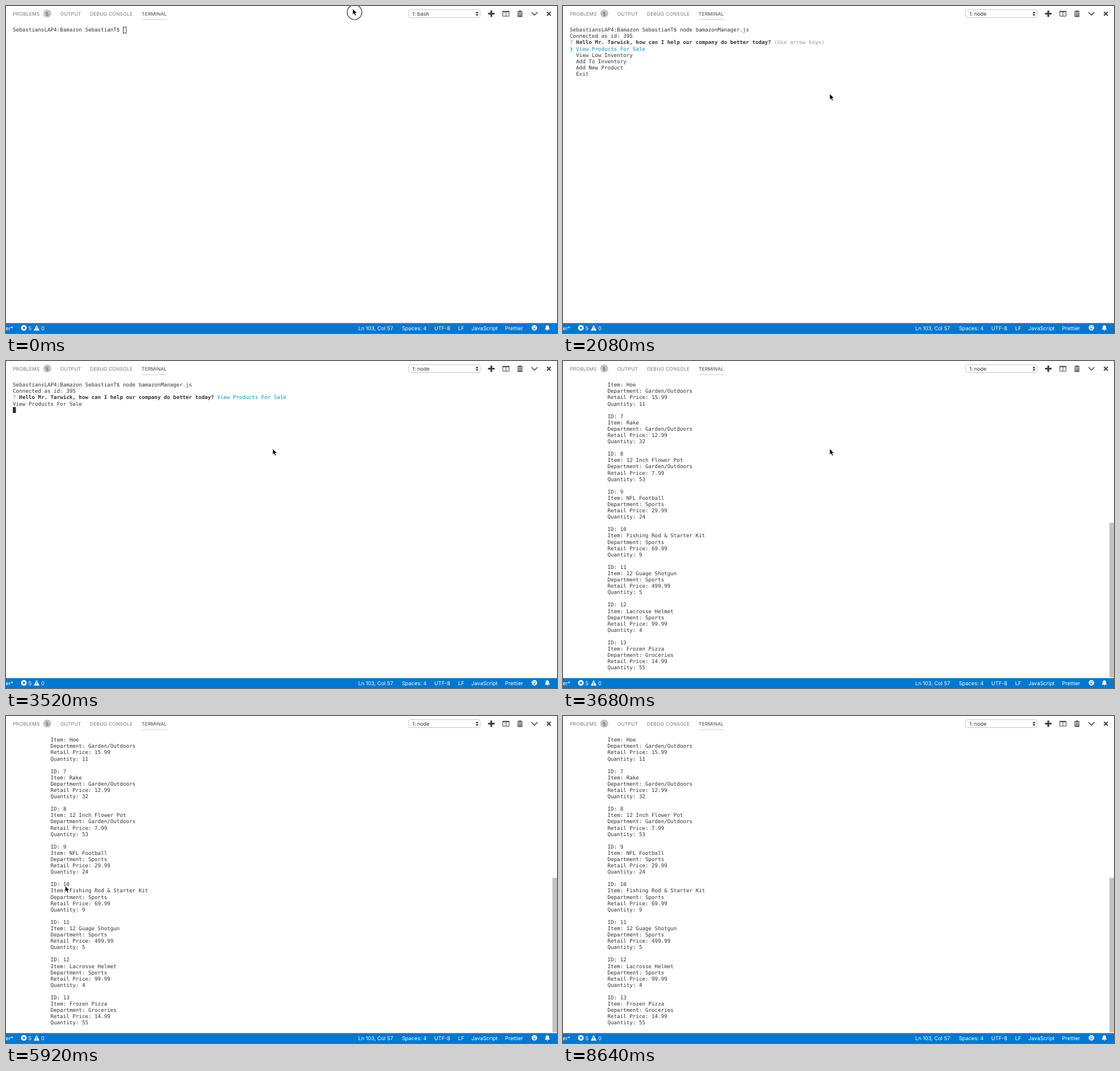
Write an HTML page that moves like this. It is 971 px wide and 577 px high and loops after 9120 ms.

```html
<!DOCTYPE html>
<html lang="en">
<head>
<meta charset="utf-8">
<title>Terminal session</title>
<style>
  html, body { margin: 0; width: 100%; height: 100%; overflow: hidden; background: #fff; }
  svg { display: block; position: absolute; left: 0; top: 0; }
  text { white-space: pre; text-rendering: geometricPrecision; font-family: Inter, Roboto, sans-serif; }
  .tabs text { font-size: 8.47px; letter-spacing: .2px; fill: #777; }
  .tabs .on { fill: #424242; }
  .status text { font-size: 9.24px; fill: #fff; }
  .term text { font: 9.215px "DejaVu Sans Mono", "Liberation Mono", monospace; fill: #333; }
  .term .bold { font-weight: bold; }
  .term .ok { fill: #16c60c; }
  .term .pick { fill: #0598bc; }
  .term .dim { fill: #999; }
</style>
</head>
<body>
<svg width="971" height="577" viewBox="0 0 971 577">
  <rect width="971" height="577" fill="#fff"/>

  <g class="tabs">
    <text x="12" y="17">PROBLEMS</text>
    <circle cx="72.7" cy="13.3" r="7" fill="#c4c4c4"/>
    <text x="70" y="16.5" style="fill:#444">5</text>
    <text x="95.7" y="17">OUTPUT</text>
    <text x="148" y="17">DEBUG CONSOLE</text>
    <text class="on" x="239" y="17">TERMINAL</text>
    <path d="M239 24H283" stroke="#c8c8c8"/>
  </g>

  <rect x="709.5" y="6.5" width="126" height="14" rx="3" fill="#fff" stroke="#c6c6c6"/>
  <text id="shell" x="716" y="16.9" font-size="9" fill="#333"></text>
  <path d="M827.5 12.7 830 9.5 832.5 12.7ZM827.5 14.5 830 17.7 832.5 14.5Z" fill="#333"/>

  <g fill="none" stroke="#424242">
    <path d="M849.5 13.5H861M855.2 8V19.3" stroke-width="3.2"/>
    <path d="M875.5 9.8H886.5V18H875.5ZM881 9V18"/>
    <path d="M875 9.7H887" stroke-width="2"/>
    <path d="M901 10.2H910.5M904 9.5V8.5H907.5V9.5" stroke-width="1.2"/>
    <path d="M902.3 11.5V18.5H909.2V11.5M904.6 11.5V18M906.9 11.5V18" stroke-width="1.3"/>
    <path d="M926 11 931.3 16.3 936.6 11" stroke-width="1.5"/>
    <path d="M953.3 10.3 960 17M960 10.3 953.3 17" stroke-width="2"/>
  </g>

  <g class="term">
    <g id="rows"></g>
    <rect id="caret" width="5.5" height="10.6"/>
  </g>
  <rect id="bar" x="963" y="285.5" width="8" height="272.5" fill="#c1c1c1"/>

  <g class="status">
    <rect y="559.5" width="971" height="17.5" fill="#0078d0"/>
    <text x="-.5" y="571.5">er*</text>
    <circle cx="31.5" cy="568" r="5" fill="#fff"/>
    <path d="M29.4 565.9 33.6 570.1M33.6 565.9 29.4 570.1" stroke="#0078d0" stroke-width="1.4"/>
    <text x="39.5" y="571.5">5</text>
    <path d="M54 562.8 59 572.8H49Z" fill="#fff"/>
    <path d="M54 566V569.6M54 570.5V571.7" stroke="#0078d0" stroke-width="1.2"/>
    <text x="62" y="571.5">0</text>
    <text x="620.7" y="571.5">Ln 103, Col 57</text>
    <text x="697.7" y="571.5">Spaces: 4</text>
    <text x="754.8" y="571.5">UTF-8</text>
    <text x="796.7" y="571.5">LF</text>
    <text x="820" y="571.5">JavaScript</text>
    <text x="879.6" y="571.5">Prettier</text>
    <circle cx="931.2" cy="567.8" r="4.8" fill="#fff"/>
    <path d="M928.5 568.8A2.8 2.8 0 0 0 933.9 568.8Z" fill="#0078d0"/>
    <g fill="#0078d0"><circle cx="929.6" cy="566.2" r=".9"/><circle cx="932.8" cy="566.2" r=".9"/></g>
    <path d="M949.3 571C951 569.8 950.8 568.5 951 566.5 951.2 564.5 952.3 563.6 954 563.2 955.7 563.6 956.8 564.5 957 566.5 957.2 568.5 957 569.8 958.7 571ZM952.7 571.7H955.3A1.3 1.3 0 0 1 952.7 571.7Z" fill="#fff"/>
  </g>

  <g id="mouse">
    <circle id="ring" cx="3.2" cy="6.2" r="13" fill="none" stroke="#222" stroke-width="1.1"/>
    <path d="M0 0V10.7L2.4 8.5 4.1 12.4 6 11.6 4.3 7.8H7.6Z" fill="#000" stroke="#fff" stroke-width=".7"/>
  </g>
</svg>
<script>
const LOOP = 9120, CELL_W = 5.547, CELL_H = 11.09, LEFT = 12, TOP = 36.8;
const $ = id => document.getElementById(id);
const span = (cls, text) => `<tspan class="${cls}">${text}</tspan>`;

const prompt = 'SebastiansLAP4:Bamazon SebastianT$ ';
const command = prompt + 'node bamazonManager.js';
const connected = 'Connected as id: 395';
const question = span('ok', '?') + ' ' +
  span('bold', 'Hello Mr. Tarwick, how can I help our company do better today?') + ' ';
const choices = ['View Products For Sale', 'View Low Inventory', 'Add To Inventory', 'Add New Product', 'Exit'];

const menu = (active, hint = '') => [command, connected, question + span('dim', hint),
  ...choices.map((c, i) => i === active ? span('pick', '❯ ' + c) : '  ' + c)];

const products = [
  [6, 'Hoe', 'Garden/Outdoors', '15.99', 11],
  [7, 'Rake', 'Garden/Outdoors', '12.99', 32],
  [8, '12 Inch Flower Pot', 'Garden/Outdoors', '7.99', 53],
  [9, 'NFL Football', 'Sports', '29.99', 24],
  [10, 'Fishing Rod &amp; Starter Kit', 'Sports', '69.99', 9],
  [11, '12 Guage Shotgun', 'Sports', '499.99', 5],
  [12, 'Lacrosse Helmet', 'Sports', '99.99', 4],
  [13, 'Frozen Pizza', 'Groceries', '14.99', 55]
];
// The first ID line has scrolled out of view.
const listing = products.flatMap(([id, item, dept, price, qty]) => [
  'ID: ' + id, 'Item: ' + item, 'Department: ' + dept,
  'Retail Price: ' + price, 'Quantity: ' + qty, ''
]).slice(1).map(line => line && ' '.repeat(12) + line);

// caret: [column, row]
const scenes = [
  { at: 0, shell: 'bash', rows: [prompt], caret: [35, 0], hollow: true },
  { at: 320, shell: 'bash', rows: [prompt], caret: [35, 0] },
  { at: 800, shell: 'bash', rows: [prompt + 'clear'], caret: [40, 0] },
  { at: 1280, shell: 'bash', rows: [command], caret: [57, 0] },
  { at: 1760, shell: 'bash', rows: [command], caret: [0, 1] },
  { at: 1920, shell: 'node', rows: [command], caret: [0, 1] },
  { at: 2080, shell: 'node', rows: menu(0, '(Use arrow keys)') },
  { at: 2880, shell: 'node', rows: menu(1) },
  { at: 3200, shell: 'node', rows: menu(0) },
  { at: 3520, shell: 'node', caret: [0, 4],
    rows: [command, connected, question + span('pick', choices[0]), choices[0]] },
  { at: 3680, shell: 'node', rows: listing, bar: true }
];

// Runs of pointer positions, one every 160 ms; null hides the pointer.
const ring = true;
const runs = [
  [0, [611, 4.8, ring], [560, 62], [470, 154.8, ring], [470, 154.8]],
  [4000, [377.5, 155], null],
  [4480, [75.5, 252.5], [84, 274], [94, 292], [103, 301], [112, 305], [114.5, 304], [109, 301]],
  [5600, [104, 299], [102, 298.5], [104.3, 299.7], [109, 310], [118, 327], [127, 343], [131, 349]],
  [6720, [130, 348], [129.5, 347.5], [130, 347.3], [137, 348.5], [146, 349]],
  [8000, [180, 318], [268, 222], [398, 104], [544, .5], null]
];
const moves = runs.flatMap(([start, ...points]) =>
  points.map((point, i) => ({ at: start + i * 160, point })));

const current = (list, t) => list.findLast(step => step.at <= t);
const show = (el, on) => el.setAttribute('visibility', on ? 'inherit' : 'hidden');

function drawScene({ shell, rows, caret, hollow, bar }) {
  $('shell').textContent = '1: ' + shell;
  $('rows').innerHTML = rows.map((row, i) =>
    `<text x="${LEFT}" y="${TOP + 8.5 + i * CELL_H}">${row}</text>`).join('');
  show($('bar'), bar);
  show($('caret'), caret);
  if (!caret) return;
  const inset = hollow ? .4 : 0;
  $('caret').setAttribute('x', LEFT + caret[0] * CELL_W + inset);
  $('caret').setAttribute('y', TOP + caret[1] * CELL_H + inset);
  $('caret').setAttribute('fill', hollow ? 'none' : '#333');
  $('caret').setAttribute('stroke', hollow ? '#333' : 'none');
}

function drawMouse({ point }) {
  show($('mouse'), point);
  if (!point) return;
  $('mouse').setAttribute('transform', `translate(${point[0]} ${point[1]})`);
  show($('ring'), point[2]);
}

let scene, move;
function tick() {
  const t = performance.now() % LOOP;
  const nextScene = current(scenes, t), nextMove = current(moves, t);
  if (nextScene !== scene) drawScene(scene = nextScene);
  if (nextMove !== move) drawMouse(move = nextMove);
  requestAnimationFrame(tick);
}
tick();
</script>
</body>
</html>
```
